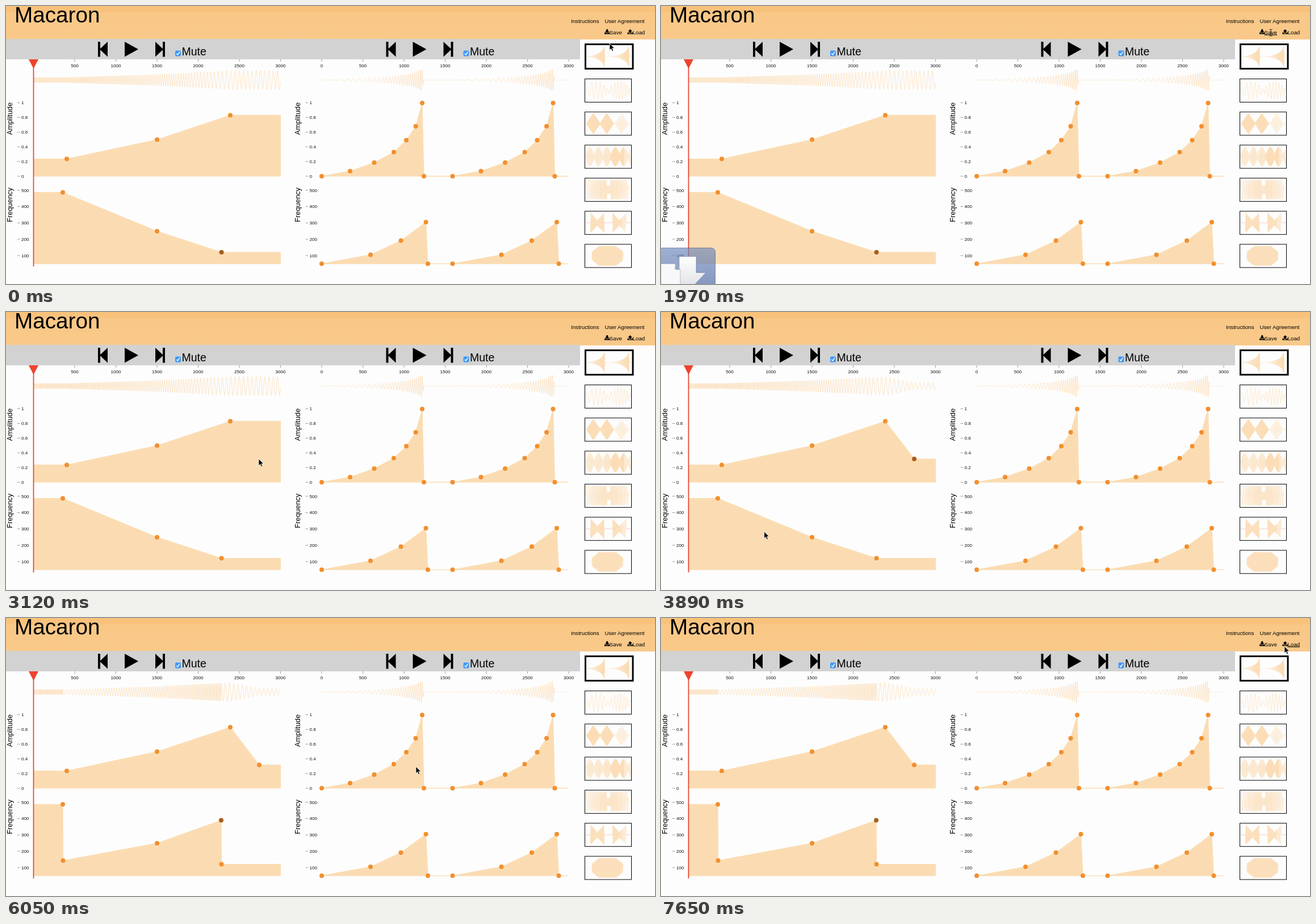
Animation of 1143 by 490 pixels, one loop 8 s. Source, as an HTML page:

```html
<!DOCTYPE html>
<html lang="en">
<head>
<meta charset="utf-8">
<title>Macaron</title>
<style>
  html, body { margin: 0; width: 100%; height: 100%; overflow: hidden; background: #fdfdfd; }
  svg { display: block; width: 1143px; height: 490px; }
  text { font-family: "Liberation Sans", Arial, sans-serif; fill: #000; }
  .tick { font-size: 8.1px; fill: #111; }
  .mid { text-anchor: middle; }
  .name { font-size: 12.9px; text-anchor: middle; }
  .link { font-size: 9.7px; }
  .mute { font-size: 19.5px; }
  .axis { stroke: #999; stroke-width: 1; }
  .area { fill: #fbdcb2; stroke: #fbdcb2; stroke-width: 1; }
  .wave { fill: none; stroke: #fbdbb3; stroke-width: .75; }
  .dot { fill: #f28f2e; }
  .dot.on { fill: #a5601f; }
  .thumb { fill: none; stroke: #000; }
</style>
</head>
<body>
<svg viewBox="0 0 1143 490">
  <defs>
    <linearGradient id="head" x2="0" y2="1">
      <stop offset="0" stop-color="#f8c27b"/><stop offset=".17" stop-color="#f8c27c"/>
      <stop offset=".2" stop-color="#f9c887"/><stop offset="1" stop-color="#f9c98a"/>
    </linearGradient>
    <linearGradient id="blue" x2="0" y2="1">
      <stop offset="0" stop-color="#6f8abd"/><stop offset="1" stop-color="#3b5797"/>
    </linearGradient>
    <linearGradient id="silver" x2="0" y2="1">
      <stop offset="0" stop-color="#fff"/><stop offset="1" stop-color="#dcdde2"/>
    </linearGradient>
    <g id="controls">
      <path id="skip" d="M162 63h4v12.200l13-12.200v26.500l-13-12.300v12.300h-4z"/>
      <path d="M209 63l24 13.200-24 13.300z"/>
      <use href="#skip" transform="translate(442)scale(-1 1)"/>
      <rect x="298" y="78.500" width="10" height="10" rx="2" fill="#3f97f6"/>
      <path d="M300.300 83.700l2.100 2.300 3.600-5.300" fill="none" stroke="#fff" stroke-width="1.400"/>
      <text class="mute" x="309.500" y="86.500">Mute</text>
    </g>
  </defs>
  <rect width="1143" height="59" fill="url(#head)"/>
  <rect y="58" width="1011" height="36" fill="#d2d2d2"/>
  <text x="15" y="28.500" font-size="38.700">Macaron</text>
  <text class="link" x="995" y="29.500">Instructions</text>
  <text class="link" x="1054.500" y="29.500">User Agreement</text>
  <path transform="translate(1054 41)" d="M3.200 0h3v3h2.300L4.700 6.800 1 3h2.200zM0 5.600h2.400l2.300 2 2.300-2h2.500v3H0z"/>
  <text class="link" x="1062.800" y="49.500">Save</text>
  <path transform="translate(1094.500 41)" d="M4.700 0l3.800 3.700H6.200v3h-3v-3H.9zM0 5.500h2.400v2H7v-2h2.500v3H0z"/>
  <text class="link" x="1103.700" y="49.500">Load</text>
  <path id="saveLine" d="M1062.500 51h22.500" stroke="#000"/>
  <path id="loadLine" d="M1103.500 51h21.500" stroke="#000"/>
  <use href="#controls"/>
  <use href="#controls" x="507.500"/>
  <g id="axes"></g>
  <g id="thumbs"></g>
  <g id="left"></g>
  <g id="right"></g>
  <path d="M48.500 94V459" stroke="#e8412c" stroke-width="1.700"/>
  <path d="M40 94h17L48.500 110.500z" fill="#ee432d"/>
  <g id="drop">
    <rect id="tile" x="-4" width="99.500" height="91" rx="7" fill="url(#blue)" stroke="#344d85"/>
    <path d="M32 15h30v28.500h17L47.500 77 16 43.500h16z" fill="url(#silver)" stroke="#3d5488" stroke-opacity=".4"/>
    <path id="page" d="M0 28h25l9 10v40H0zM25 28v10h9" fill="#f8f8fa" stroke="#b9bdc8"/>
  </g>
  <path id="arrow" d="M0 0V11.800L2.700 9.300 4.500 13.600 6.600 12.700 4.800 8.500H8.500z" stroke="#fff" stroke-width=".7"/>
  <path id="beam" d="M-2.500-6Q0-6 0-4.500Q0-6 2.500-6M0-5V5M-2.500 6Q0 6 0 4.500Q0 6 2.500 6M-1.500 1.500h3" fill="none" stroke="#222"/>
</svg>
<script>
const LOOP = 8000, SPAN = 435, SHIFT = 507.5, START = 48.5, RIGHT = START + SHIFT;
const AMP_BASE = 300, FREQ_BASE = 454.3;
const $ = id => document.getElementById(id);

// Piecewise linear function through [u, v] points
const ramp = pts => u => {
  if (u <= pts[0][0]) return pts[0][1];
  for (let i = 1; i < pts.length; i++) {
    const [a, p] = pts[i - 1], [b, q] = pts[i];
    if (u < b) return p + (q - p) * (u - a) / (b - a);
  }
  return pts[pts.length - 1][1];
};

// Sine with varying amplitude and cycles per width
function wave(x, w, cy, half, amp, freq, steps = 2400) {
  let phase = 0, d = "";
  for (let i = 0; i <= steps; i++) {
    const u = i / steps;
    const y = cy - half * amp(u) * Math.sin(phase);
    d += (i ? "L" : "M") + (x + u * w).toFixed(2) + " " + y.toFixed(2);
    phase += 2 * Math.PI * freq(u) / steps;
  }
  return `<path class="wave" d="${d}"/>`;
}

const toAmp = (pts, x0) => ramp(pts.map(([x, y]) => [(x - x0) / SPAN, (AMP_BASE - y) / 129.5]));
const toFreq = (pts, x0) => ramp(pts.map(([x, y]) => [(x - x0) / SPAN, (50 + (FREQ_BASE - y) / .288) * SPAN / 900]));

function curve(pts, x0, base, picked) {
  const line = pts.map(p => p.join(" ")).join("L");
  const d = `M${x0} ${base}V${pts[0][1]}L${line}H${x0 + SPAN}V${base}z`;
  const dots = pts.map(p =>
    `<circle class="dot${p === picked ? " on" : ""}" cx="${p[0]}" cy="${p[1]}" r="4"/>`);
  return `<path class="area" d="${d}"/>` + dots.join("");
}

function panel(amp, freq, x0, picked) {
  return wave(x0, SPAN, 130.5, 20, toAmp(amp, x0), toFreq(freq, x0)) +
    curve(amp, x0, AMP_BASE, picked) + curve(freq, x0, FREQ_BASE, picked);
}

function axes(dx) {
  let s = "";
  for (let i = dx ? 0 : 1; i <= 6; i++) {
    const x = START + dx + i * 72.5;
    s += `<path class="axis" d="M${x} 94v4"/><text class="tick mid" x="${x}" y="108">${i * 500}</text>`;
  }
  const row = (y, label) =>
    `<path class="axis" d="M${20 + dx} ${y}h4.5"/><text class="tick" x="${27 + dx}" y="${y + 2.9}">${label}</text>`;
  for (let i = 0; i <= 5; i++) s += row(300 - i * 25.9, i / 5);
  for (let i = 1; i <= 5; i++) s += row(468.7 - i * 28.8, i * 100);
  const name = (y, label) =>
    `<text class="name" transform="translate(${10.5 + dx} ${y})rotate(-90)">${label}</text>`;
  return s + name(198.5, "Amplitude") + name(350.5, "Frequency");
}

// The right panel repeats one burst
const twice = pts => [...pts, ...pts.map(([x, y]) => [x + 230.5, y])];
const rightAmp = twice([[556, 300], [606, 291], [648.5, 276], [683, 257.5], [705, 236.5], [721.5, 212], [733, 171], [736, 300]]);
const rightFreq = twice([[556, 454.3], [642, 438.5], [695.5, 413.5], [739.5, 381], [743, 454.3]]);

// Envelope shapes for the thumbnails
const { abs, sin, min, max, PI } = Math;
const peakAt = (u, c, w) => max(0, 1 - abs(u - c) / w);
const bow = (u, c) => abs(u - c) < .15 ? .25 + 4.6 * abs(u - c) : 0;
const thumbs = [
  [toAmp(rightAmp, RIGHT), toFreq(rightFreq, RIGHT)],
  [u => .85 * abs(sin(2 * PI * u)) ** .6, u => 9 + 7 * u],
  [u => max(peakAt(u, .17, .16), peakAt(u, .47, .16), peakAt(u, .8, .16)), u => u < .64 ? 110 : 25],
  [u => .25 + .65 * abs(sin(5.3 * PI * u)), u => u > .55 && u < .85 ? 110 : 40],
  [u => u > .95 ? 0 : u > .47 && u < .55 ? .4 : .9, u => 14 + 36 * sin(PI * u)],
  [u => max(bow(u, .26), bow(u, .75)), u => u < .8 ? 80 : 35],
  [u => u > .14 && u < .83 ? min(.92, .4 + 3.4 * min(u - .14, .83 - u)) : 0, () => 85]
];

$("axes").innerHTML = axes(0) + axes(SHIFT);
$("right").innerHTML = panel(rightAmp, rightFreq, RIGHT);
$("thumbs").innerHTML = thumbs.map(([amp, freq], i) => {
  const y = 70.2 + i * 58.3;
  const box = i ? `x="1019.5" y="${y}" width="82" height="41"` : `x="1020.5" y="67.5" width="83.5" height="43" stroke-width="3"`;
  return wave(1021, i ? 79 : 81, i ? y + 20.5 : 89, 18.5, amp, freq) + `<rect class="thumb" ${box}/>`;
}).join("");

const low = [379.5, 434], fade = [446, 259], dip = [100.5, 427.5], peak = [379, 356.5];

// Each edit: time, points present so far, selected point
const edits = [
  [0, [], low], [3060, []], [3240, [fade], fade], [4130, [fade]],
  [4250, [fade, dip], dip], [5030, [fade, dip]], [5150, [fade, dip, peak], peak]
];

function leftPanel([, added, picked]) {
  const has = p => added.includes(p) ? [p] : [];
  const amp = [[107, 269.5], [266, 235.5], [395, 192.5], ...has(fade)];
  const freq = [[100, 328.5], ...has(dip), [266, 397], ...has(peak), low];
  return panel(amp, freq, START, picked);
}
const states = edits.map(leftPanel);

// Pointer moves: from time, to time, x, y; it rests in between
const moves = [
  [0, 0, 1063, 66], [150, 320, 1067, 45], [980, 1210, 1074, 46], [1330, 1500, 1074, 47],
  [2000, 2320, 587, 139], [2410, 2470, 489, 399], [2620, 3000, 445, 259], [3540, 4000, 100, 427],
  [4420, 4630, 320, 398], [4630, 4860, 379, 357], [5510, 5690, 535, 317], [5810, 6050, 722, 262],
  [6170, 6400, 669, 190], [6400, 6550, 680, 145], [6550, 6750, 860, 150], [6750, 6900, 960, 125],
  [6900, 7030, 932, 104], [7050, 7500, 1098, 50]
];

function pointer(t) {
  let x = 0, y = 0;
  for (const [from, to, nx, ny] of moves) {
    if (t < from) break;
    const k = t >= to ? 1 : (t - from) / (to - from);
    x += (nx - x) * k;
    y += (ny - y) * k;
  }
  return `translate(${x} ${y})`;
}

const show = (id, on) => $(id).style.display = on ? "" : "none";
let current = -1;

function draw(t) {
  const state = edits.filter(e => e[0] <= t).length - 1;
  if (state !== current) $("left").innerHTML = states[current = state];

  const typing = t >= 1040 && t < 2030;
  const place = pointer(t);
  $("arrow").setAttribute("transform", place);
  $("beam").setAttribute("transform", place);
  show("arrow", !typing);
  show("beam", typing);
  show("saveLine", t >= 1100 && t < 2030);
  show("loadLine", t >= 7480);

  const p = (t - 1740) / 230;
  show("drop", p >= 0 && p < 1.6);
  $("drop").setAttribute("transform", `translate(0 ${318 + 108 * p})`);
  $("tile").setAttribute("opacity", max(.4, .96 - .3 * p));
  show("page", p > .5);
}

function frame(now) {
  draw(now % LOOP);
  requestAnimationFrame(frame);
}
draw(0);
requestAnimationFrame(frame);
</script>
</body>
</html>
```
